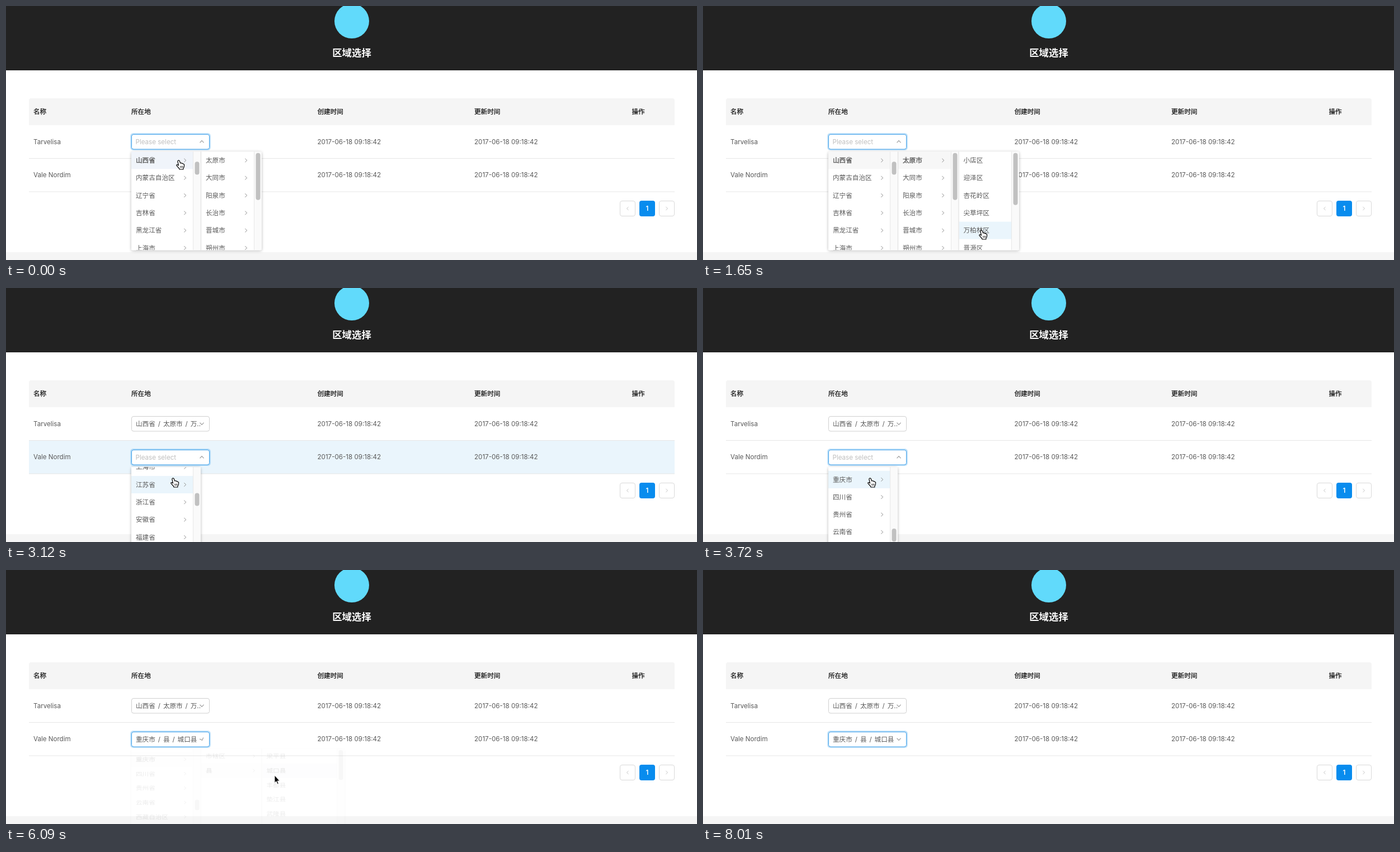
Write an HTML page that moves like this. It is 1235 px wide and 454 px high and loops after 8110 ms.

```html
<!DOCTYPE html>
<html lang="zh-CN">
<head>
<meta charset="utf-8">
<title>区域选择</title>
<style>
  html, body { margin: 0; width: 100%; height: 100%; overflow: hidden; background: #fff; }
  #stage { display: block; }
  text { font: 11.6px Inter, "Noto Sans CJK SC", "Noto Sans CJK", sans-serif; fill: #595959; white-space: pre; }
  .head { fill: #111; stroke: #111; stroke-width: .25px; }
  .active { stroke: #595959; stroke-width: .35px; }
  .hint { fill: #bfbfbf; }
  .value { word-spacing: 1.7px; }
  .title { font-size: 17.4px; font-weight: 700; fill: #fff; text-anchor: middle; }
  .page { font-weight: 600; fill: #fff; text-anchor: middle; }
</style>
</head>
<body>
<svg id="stage" width="1235" height="454" viewBox="0 0 1235 454"></svg>
<script>
const LOOP = 8110, STEP = 148.25, ITEM = 31.3, LIST = 176;
const BLUE = '#3f9fe8';
const stage = document.getElementById('stage');

const provinces = ('北京市 天津市 河北省 山西省 内蒙古自治区 辽宁省 吉林省 黑龙江省 上海市 江苏省 浙江省 安徽省 ' +
  '福建省 江西省 山东省 河南省 湖北省 湖南省 广东省 广西壮族自治区 海南省 重庆市 四川省 贵州省 云南省 ' +
  '西藏自治区 陕西省 甘肃省 青海省').split(' ');
const cities = '太原市 大同市 阳泉市 长治市 晋城市 朔州市'.split(' ');
const districts = '小店区 迎泽区 杏花岭区 尖草坪区 万柏林区 晋源区'.split(' ');
const counties = '梁平县 城口县 丰都县 垫江县 武隆县'.split(' ');

// Pointer hot spot: time, x, y
const path = [
  [0, 309, 276], [150, 309, 276], [600, 385, 277], [1000, 385, 277],
  [1500, 498, 401], [1900, 498, 401], [2300, 328, 304], [2700, 328, 304],
  [3050, 299, 340], [4000, 299, 340], [4500, 388, 365], [5150, 388, 365],
  [5600, 480, 367], [6250, 480, 367], [6850, 952, 364], [7050, 952, 364],
  [7650, 1190, 462], [LOOP, 1190, 462]
];

const clamp = v => Math.max(0, Math.min(1, v));
const ramp = (t, start, length) => clamp((t - start) / length);
const ease = p => p * p * (3 - 2 * p);
const during = (t, start, end) => t >= start && t < end;

function pointerAt(t) {
  const i = path.findIndex((k, n) => n && t <= k[0]);
  const [t0, x0, y0] = path[i - 1], [t1, x1, y1] = path[i];
  const p = ease((t - t0) / (t1 - t0));
  return { x: x0 + (x1 - x0) * p, y: y0 + (y1 - y0) * p };
}

const inside = (p, x, y, w, h) => p.x >= x && p.x < x + w && p.y >= y && p.y < y + h;
const rect = (x, y, w, h, fill, extra = '') =>
  `<rect x="${x}" y="${y}" width="${w}" height="${h}" fill="${fill}" ${extra}/>`;
const text = (x, middle, str, cls = '') =>
  `<text x="${x}" y="${middle + 4.2}" class="${cls}">${str}</text>`;
const chevron = (x, y, angle = 0, color = '#8c8c8c', size = 1) =>
  `<path d="M-1.7-3.2L1.7 0L-1.7 3.2" fill="none" stroke="${color}" transform="translate(${x} ${y}) rotate(${angle}) scale(${size})"/>`;

function page(rowHover) {
  const row = (y, name) => text(49, y, name) +
    text(556.5, y, '2017-06-18 09:18:42') + text(837, y, '2017-06-18 09:18:42');
  const pageBox = (x, angle) =>
    rect(x, 348.5, 27, 27, '#fff', 'rx="3.5" stroke="#d9d9d9"') + chevron(x + 13.5, 362, angle, '#bfbfbf', .9);
  return rect(0, 0, 1235, 454, '#fff') + rect(0, 0, 1235, 115, '#222') + rect(0, 440, 1235, 14, '#f5f5f5') +
    '<circle cx="618" cy="27" r="31" fill="#61dafb"/>' +
    text(618, 86.2, '区域选择', 'title') +
    '<path d="M41 213V169q0-4 4-4H1191q4 0 4 4V213Z" fill="#f5f5f5"/>' +
    [[49, '名称'], [224, '所在地'], [556.5, '创建时间'], [837, '更新时间'], [1118.5, '操作']]
      .map(([x, s]) => text(x, 188.5, s, 'head')).join('') +
    rect(41, 273, 1154, 59, '#eaf5fc', `opacity="${rowHover}"`) +
    rect(41, 272, 1154, 1, '#e6e6e6') + rect(41, 331.5, 1154, 1, '#e6e6e6') +
    row(242.5, 'Tarvelisa') + row(302, 'Vale Nordim') +
    pageBox(1097.5, 180) + rect(1132, 348, 28, 28, '#088cee', 'rx="4"') +
    text(1146, 362, '1', 'page') + pageBox(1167.5, 0);
}

function select(y, value, focused, hovered, open) {
  const glow = focused ? rect(223.5, y - .5, 141, 28, 'none', 'rx="4" stroke="#108ee9" stroke-opacity=".25" stroke-width="3"') : '';
  const border = focused || hovered ? BLUE : '#d0d0d0';
  return glow + rect(224.5, y + .5, 139, 26.5, '#fff', `rx="3.5" stroke="${border}"`) +
    (value ? text(232, y + 13.5, value, 'value') : text(231.5, y + 14, 'Please select', 'hint')) +
    chevron(350, y + 13.5, 90 - 180 * open, '#999', 1.1);
}

// A column: x, width, items, total item count, scroll, active index, leaf
function column(c, top, pointer) {
  const scroll = c.scroll || 0, overflow = c.total > 5;
  let s = '';
  c.items.forEach((name, i) => {
    const y = i * ITEM - scroll;
    if (y < -ITEM || y > LIST) return;
    const hover = inside(pointer, c.x, top + Math.max(0, y), c.w, ITEM + Math.min(0, y));
    const active = i === c.active;
    const fill = hover ? (active ? '#f0f4fa' : '#eaf5fc') : active ? '#f7f7f7' : '#fff';
    s += rect(0, y, c.w, ITEM, fill) + text(8, y + ITEM / 2, name, active ? 'active' : '') +
      (c.leaf ? '' : chevron(c.w - 14, y + ITEM / 2));
  });
  if (overflow) {
    const ratio = LIST / (c.total * ITEM);
    s += rect(c.w, 0, 14, LIST, '#fafafa') + rect(c.w, 0, 1, LIST, '#e8e8e8') +
      rect(c.w + 3.5, 2.5 + scroll * ratio, 8, LIST * ratio - 6, '#c1c1c1', 'rx="4"');
  }
  const full = c.w + (overflow ? 14 : 0);
  return `<svg x="${c.x}" y="${top}" width="${full}" height="${LIST}">${s}</svg>` +
    (c.x > 230 ? rect(c.x - 1, top, 1, LIST, '#dcdcdc') : '');
}

function popup(top, columns, shown, pointer) {
  if (!shown) return '';
  const last = columns[columns.length - 1];
  const width = last.x + last.w + (last.total > 5 ? 14 : 0) - 224;
  return `<g opacity="${shown}" transform="translate(0 ${top}) scale(1 ${.8 + .2 * shown}) translate(0 ${-top})">` +
    rect(224, top, width, LIST + .5, '#fff', 'rx="3" style="filter:drop-shadow(0 1px 2.5px rgba(0,0,0,.28))"') +
    columns.map(c => column(c, top, pointer)).join('') + '</g>';
}

function cursor(p, hand) {
  const shape = hand
    ? '<path d="M-2.2 1.5C-2-.5.6-.8 1.2 1L2.6 5C4 4 5.2 4.6 5.4 5.6C6.6 5 7.6 5.6 7.9 6.6C9 6.3 9.7 7 9.6 8.2L9.2 12L7.8 14V16H1L.6 14.5L-3.8 9.6C-5 8-3.4 7-2 8L-.6 9Z" fill="#fff" stroke="#000" stroke-width="1.2" stroke-linejoin="round"/>' +
      '<path d="M2.6 10l.5 3.4M4.7 9.8l.3 3.4M6.8 9.7v3.3" stroke="#000" stroke-width=".8"/>'
    : '<path d="M0 0V13.5L3 10.7L5.2 15.7L7.2 14.8L5 10H9.2Z" fill="#000" stroke="#fff" stroke-width=".9"/>';
  return `<g transform="translate(${p.x} ${p.y})">${shape}</g>`;
}

function render(t) {
  const p = pointerAt(t);
  const firstShown = 1 - ramp(t, 1830, 200);
  const secondShown = ramp(t, 2480, 200) * (1 - ramp(t, 5900, 200));
  const rowHover = ramp(t, 2080, 250) * (1 - ramp(t, 3450, 250));

  const first = [
    { x: 224, w: 110, items: provinces, total: 34, scroll: 3 * ITEM, active: 3 },
    { x: 349, w: 94, items: cities, total: 11, active: t > 720 ? 0 : -1 }
  ];
  if (t > 720) first.push({ x: 457.5, w: 93.5, items: districts, total: 10, active: t > 1780 ? 4 : -1, leaf: true });

  const second = [{
    x: 224, w: 110, items: provinces, total: 34,
    scroll: 650.6 * ease(ramp(t, 2850, 600)), active: t > 3850 ? 21 : -1
  }];
  if (t > 3850) second.push({ x: 349, w: 108, items: ['市辖区', '县'], total: 2, active: t > 4880 ? 1 : -1 });
  if (t > 4880) second.push({ x: 457.5, w: 133.5, items: counties, total: 14, active: t > 5850 ? 1 : -1, leaf: true });

  const overSelect = inside(p, 224, 289, 140, 28) && firstShown === 0;
  const hand = overSelect || t < 1850 || during(t, 2480, 5950);

  stage.innerHTML = page(rowHover) +
    select(229, t > 1830 ? '山西省 / 太原市 / 万..' : '', t < 2480, false, firstShown) +
    select(289, t > 5900 ? '重庆市 / 县 / 城口县' : '', t >= 2480, overSelect, secondShown) +
    popup(260.3, first, firstShown, p) + popup(320, second, secondShown, p) + cursor(p, hand);
}

let shownStep = -1;
function tick(now) {
  const step = Math.floor(now % LOOP / STEP);
  if (step !== shownStep) render((shownStep = step) * STEP);
  requestAnimationFrame(tick);
}
render(0);
requestAnimationFrame(tick);
</script>
</body>
</html>
```
